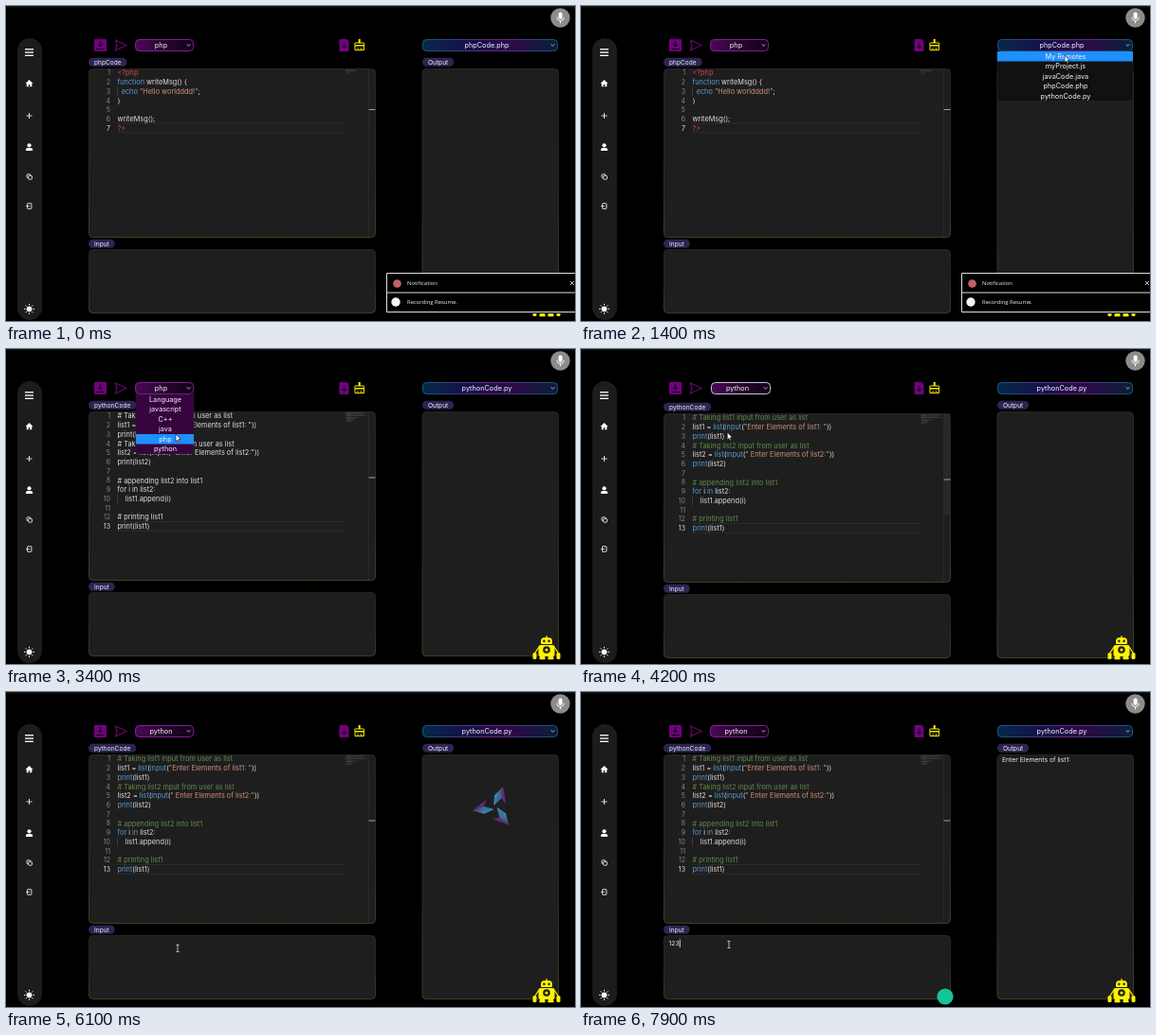
An HTML page with a canvas that plays this animation: 600 by 333 pixels, repeating every 8 s.

```html
<!DOCTYPE html>
<html lang="en">
<head>
<meta charset="utf-8">
<title>Code editor</title>
<style>
html, body { margin: 0; width: 100%; height: 100%; overflow: hidden; background: #000; }
canvas { display: block; width: 600px; height: 333px; }
</style>
</head>
<body>
<canvas id="stage"></canvas>
<script>
const W = 600, H = 333, LOOP = 8000, STEP = 100, TAU = Math.PI * 2;
const canvas = document.getElementById('stage');
const ratio = window.devicePixelRatio || 1;
canvas.width = W * ratio;
canvas.height = H * ratio;
const c = canvas.getContext('2d');
c.scale(ratio, ratio);

const UI = 'Inter, "Open Sans", sans-serif';
const NOTE = '"Open Sans", "Noto Sans", sans-serif';
const PURPLE = '#750080', YELLOW = '#fff200', PANEL = '#1e1e1e', DARK = '#12001a';
const LINE = 9.73, ROW = 10.5;

const PHP = ['<?php', 'function writeMsg() {', '  echo "Hello worldddd!";', '}', '', 'writeMsg();', '?>'];
const PYTHON = [
  '# Taking list1 input from user as list',
  'list1 = list(input("Enter Elements of list1: "))',
  'print(list1)',
  '# Taking list2 input from user as list',
  'list2 = list(input(" Enter Elements of list2:"))',
  'print(list2)', '',
  '# appending list2 into list1',
  'for i in list2:',
  '    list1.append(i)', '',
  '# printing list1',
  'print(list1)'
];
const FILES = ['My Remotes', 'myProject.js', 'javaCode.java', 'phpCode.php', 'pythonCode.py'];
const LANGS = ['Language', 'javascript', 'C++', 'java', 'php', 'python'];
const TOKEN = /(#.*)|("[^"]*")|(<\?php|\?>)|\b(function|echo|print|list|input|for|in)\b/g;
const TOKEN_COLORS = ['#608b4e', '#ce9178', '#d64550', '#569cd6'];

// Pointer stops: time, x, y
const PATH = [
  [0, 470, 244], [1000, 520, 44], [1400, 510, 52], [1700, 510, 94], [2100, 356, 107],
  [2700, 194, 42], [3400, 179, 90], [3700, 168, 105], [5100, 121, 47], [5400, 121, 47],
  [6100, 181, 271], [6800, 156, 267]
];

function pointerAt(t) {
  const i = PATH.findIndex(p => p[0] > t);
  if (i < 0) return PATH[PATH.length - 1].slice(1);
  const [t0, x0, y0] = PATH[i - 1], [t1, x1, y1] = PATH[i];
  let k = (t - t0) / (t1 - t0);
  k = k * k * (3 - 2 * k);
  return [x0 + (x1 - x0) * k, y0 + (y1 - y0) * k];
}

function paint(fill, stroke, lw = 1) {
  if (fill) { c.fillStyle = fill; c.fill(); }
  if (stroke) { c.strokeStyle = stroke; c.lineWidth = lw; c.stroke(); }
}

function box(x, y, w, h, r, fill, stroke, lw) {
  c.beginPath();
  c.roundRect(x, y, w, h, r);
  paint(fill, stroke, lw);
}

function rect(x, y, w, h, fill) {
  c.fillStyle = fill;
  c.fillRect(x, y, w, h);
}

function disc(x, y, r, fill) {
  c.beginPath();
  c.arc(x, y, r, 0, TAU);
  paint(fill);
}

function line(x0, y0, x1, y1, color, lw = 0.8) {
  c.beginPath();
  c.moveTo(x0, y0);
  c.lineTo(x1, y1);
  paint(null, color, lw);
}

function poly(points, fill, stroke, lw) {
  c.beginPath();
  points.forEach(p => c.lineTo(...p));
  c.closePath();
  paint(fill, stroke, lw);
}

function cross(x, y, r, color) {
  line(x - r, y - r, x + r, y + r, color);
  line(x + r, y - r, x - r, y + r, color);
}

function downArrow(x, y) {
  rect(x - 0.8, y - 4, 1.6, 4, DARK);
  poly([[x - 3, y - 0.5], [x + 3, y - 0.5], [x, y + 2.5]], DARK);
}

function setFont(size, family = UI) {
  c.font = size + 'px ' + family;
}

function text(s, x, y, size, color, align = 'left', family = UI) {
  setFont(size, family);
  c.textAlign = align;
  c.fillStyle = color;
  c.fillText(s, x, y + size * 0.36);
}

function gradient(x0, y0, x1, y1, ...colors) {
  const g = c.createLinearGradient(x0, y0, x1, y1);
  colors.forEach((col, i) => g.addColorStop(i / (colors.length - 1), col));
  return g;
}

function sidebar() {
  const x = 24.5;
  box(12, 34, 26, 298, 13, '#1c1c1c');
  for (let i = -1; i <= 1; i++) rect(x - 4.5, 48.4 + i * 3.3, 9, 1.3, '#fff');

  poly([[x - 4, 82], [x, 78], [x + 4, 82]], '#fff');
  rect(x - 2.8, 81.5, 5.6, 3.7, '#fff');
  rect(x - 0.7, 83, 1.4, 2.2, '#1c1c1c');

  line(x - 3, 116, x + 3, 116, '#ddd', 1);
  line(x, 113, x, 119, '#ddd', 1);

  disc(x, 147.3, 2.1, '#fff');
  box(x - 3.6, 149.9, 7.2, 3, [2, 2, 0, 0], '#fff');

  for (const d of [0, 1.6]) box(x - 2.5 + d, 177.8 + d, 3.8, 3.8, 0.7, '#1c1c1c', '#ddd');

  box(x - 2, 208.7, 4.4, 5.6, 0.5, null, '#ddd');
  line(x - 3.6, 211.5, x + 0.6, 211.5, '#ddd');

  disc(x, 320.3, 2.9, '#fff');
  for (let a = 0; a < TAU; a += TAU / 8) {
    const dx = Math.cos(a), dy = Math.sin(a);
    line(x + dx * 4, 320.3 + dy * 4, x + dx * 5.5, 320.3 + dy * 5.5, '#fff', 1);
  }
}

function mic() {
  disc(584.5, 12.5, 10.2, '#8c8c8c');
  box(582.6, 6.5, 4, 7.5, 2, '#fff');
  c.beginPath();
  c.arc(584.6, 11.8, 3.8, 0, Math.PI);
  paint(null, '#fff', 0.9);
  rect(584.1, 15.6, 1, 2.7, '#fff');
}

function select(x, w, label, fill, border, ring) {
  box(x + 0.5, 35.5, w - 1, 12, 4, fill, ring ? '#ded6ea' : border, 0.9);
  text(label, x + w / 2 - 3.5, 41.2, 7.3, '#f4f4f4', 'center');
  const ax = x + w - 5.5;
  line(ax - 1.8, 40.4, ax, 42.2, '#ddd');
  line(ax, 42.2, ax + 1.8, 40.4, '#ddd');
}

function toolbar(s) {
  box(93, 35, 13, 13, 1, PURPLE);
  downArrow(99.5, 41.3);
  rect(95.5, 45, 8, 1.1, DARK);

  poly([[115.5, 36.2], [127, 41.5], [115.5, 46.8], [117, 41.5]], null, s.hover ? '#43084b' : '#5d0867', 1.3);

  const grow = s.langRing ? 1 : 0;
  select(136 + grow, 62 + grow, s.lang,
    gradient(136, 0, 198, 0, '#4b0958', '#28042f', DARK), '#8a259b', s.langRing);

  box(351.5, 35, 10, 13, [1, 4, 1, 1], PURPLE);
  downArrow(356.6, 42.8);

  rect(371.7, 35, 2, 4, YELLOW);
  box(367.8, 39, 9.8, 2.8, 0.5, null, YELLOW);
  box(368, 41.8, 9.4, 4.8, 0, null, YELLOW);
  for (const x of [371, 374.4]) line(x, 44, x, 46.6, YELLOW);

  select(439 - s.fileRing, 143 + 2 * s.fileRing, s.file,
    gradient(439, 0, 582, 0, '#06294a', '#15104a', '#2d0a48', '#08203a'),
    gradient(439, 0, 582, 0, '#176080', '#6f288d', '#176080'), s.fileRing);
}

function pill(label, x, y) {
  setFont(6.6);
  const w = c.measureText(label).width + 12;
  box(x, y, w, 9, 4.5, '#2c2551');
  text(label, x + w / 2, y + 4.6, 6.6, '#ececf6', 'center');
}

function panel(x, y, w, h) {
  box(x + 0.5, y + 0.5, w - 1, h - 1, 4, PANEL, gradient(0, y, 0, y + h, '#2c2a29', '#2e2d25', '#4b4921'), 0.8);
}

function codeLine(s, x, y, colored) {
  const put = (part, color) => {
    text(part, x, y, 7.35, color);
    x += c.measureText(part).width;
  };
  if (!colored) return put(s, '#dedede');
  let last = 0;
  for (const m of s.matchAll(TOKEN)) {
    put(s.slice(last, m.index), '#dedede');
    put(m[0], TOKEN_COLORS[m.slice(1).findIndex(Boolean)]);
    last = m.index + m[0].length;
  }
  put(s.slice(last), '#dedede');
}

function editor(s) {
  const top = 66 + s.shift, last = s.code.length - 1;
  panel(87, top, 303, 179);
  for (const n of [last, last + 1]) {
    const y = top - 0.3 + n * LINE;
    line(117, y, 357, y, '#303030');
  }
  if (s.slider) rect(358, top, 24, 13.5, '#303030');
  s.code.forEach((row, i) => {
    const y = top + 4.8 + i * LINE;
    text(i + 1, 110, y, 7, i === last ? '#dcdcdc' : '#858585', 'right');
    if (row[0] === ' ') rect(117.2, y - 4.8, 0.7, LINE, '#454545');
    codeLine(row, 117.5, y, s.colored);
    rect(358.5, top + 1 + i * 0.75, row.length * 0.46, 0.45, s.colored && row[0] === '#' ? '#38492f' : '#505355');
  });
  rect(382, top + 1, 0.7, 177, '#2d2d2d');
  if (s.slider || s.shift) rect(382.5, top + 0.5, 7, 107, s.slider ? '#484848' : '#292929');
  rect(382.5, top + (s.code === PHP ? 43 : 69.5), 7, 1, '#a0a0a0');
}

function menu(items, x, w, bg, y, chosen) {
  const top = 48;
  const active = y < top ? chosen : Math.min(items.length - 1, Math.floor((y - top) / ROW));
  box(x, top, w, items.length * ROW, 0, bg, '#2a2a2a', 0.5);
  rect(x, top + active * ROW, w, ROW, '#1e90ff');
  items.forEach((item, i) => text(item, x + w / 2 + 0.5, top + ROW * (i + 0.5), 7.3, '#f4f4f4', 'center'));
}

function spinner(t) {
  c.save();
  c.translate(515.5, 122);
  c.rotate((t - 6100) / 1000 * Math.PI - 0.1);
  const tip = [11, -21], fold = [8, -9];
  for (let i = 0; i < 3; i++) {
    poly([tip, [1, -13], [-1, -2], fold], gradient(0, -2, 11, -21, '#2f9fd0', '#4a86b4', '#583a78'));
    poly([tip, fold, [12, -2]], '#672782');
    for (let k = 1; k < 6; k++) line(k * 2, -9 - k * 2, k * 1.5, -3 - k, '#25253c', 0.4);
    c.rotate(TAU / 3);
  }
  c.restore();
}

function robot() {
  const x = 570;
  rect(x - 0.6, 303, 1.2, 3, YELLOW);
  box(x - 6, 305, 12, 7, [4, 4, 1, 1], YELLOW);
  box(x - 8.5, 313, 17, 12, 2, YELLOW);
  disc(x, 318, 3.8, PANEL);
  disc(x, 318, 1.6, YELLOW);
  for (const side of [-1, 1]) {
    disc(x + side * 2.6, 308.8, 1.2, PANEL);
    line(x + side * 8, 315, x + side * 12, 321, YELLOW, 1.3);
    box(x + side * 12.5 - 2, 321, 4, 7, 1.5, YELLOW);
    box(x + side * 4.5 - 3, 324, 6, 4.2, [2.5, 2.5, 0, 0], YELLOW);
  }
}

function notification() {
  rect(401, 282, 199, 43, '#000');
  box(401.5, 282.5, 205, 41, 0, null, '#dedede');
  rect(402, 302.5, 198, 1, '#dedede');
  disc(412.5, 293.5, 4.3, '#c45f70');
  disc(411, 313, 4.7, '#f5f5f5');
  text('Notification', 423, 293.2, 5.9, '#f2f2f2', 'left', NOTE);
  text('Recording Resume.', 423, 313.2, 5.9, '#f2f2f2', 'left', NOTE);
  cross(597, 293, 2, '#eee');
}

function pointer(t) {
  if (t < 100) return;
  c.save();
  c.translate(...pointerAt(t));
  if (t >= 5600) {
    line(0, -3.6, 0, 3.6, '#ddd');
    for (const y of [-3.6, 3.6]) line(-1.6, y, 1.6, y, '#ddd');
  } else if (t >= 4500) {
    box(-2.6, 4, 6.4, 5, 1.5, '#fff', '#111', 0.5);
    box(-1, 0, 2, 6, 1, '#fff');
  } else {
    poly([[0, 0], [0, 7.6], [1.7, 6.1], [2.9, 8.6], [4, 8.1], [2.9, 5.6], [5.2, 5.5]], '#fff', '#111', 0.6);
  }
  c.restore();
}

function stateAt(t) {
  const within = (a, b) => t >= a && t < b;
  const python = t >= 1700, colored = t >= 3700, langRing = within(3700, 5300);
  return {
    code: python ? PYTHON : PHP,
    file: FILES[python ? 4 : 3],
    lang: LANGS[colored ? 5 : 4],
    colored: !python || colored,
    fileRing: within(1700, 2700),
    langRing,
    shift: langRing ? 2 : 0,
    slider: within(2000, 2400),
    hover: within(4800, 5500),
    fileMenu: within(1000, 1700),
    langMenu: within(2800, 3700),
    loading: within(5400, 7300),
    typed: '123'.slice(0, Math.max(0, Math.floor((t - 7200) / 200)))
  };
}

function inputText(s, t) {
  text(s.typed, 92.5, 265.6, 6.8, '#eee');
  const x = 92.7 + c.measureText(s.typed).width;
  if (s.typed || t % 1000 < 500) rect(x, 261.5, 0.8, 8.5, '#fff');
  if (s.typed) disc(384, 322, 8.6, '#15c39a');
}

function draw(t) {
  const s = stateAt(t), y = pointerAt(t)[1];
  rect(0, 0, W, H, '#000');
  rect(0, 0, W, 1.5, '#151515');
  sidebar();
  mic();
  toolbar(s);

  pill(s.code === PYTHON ? 'pythonCode' : 'phpCode', 87, 54.8 + s.shift);
  editor(s);
  pill('Input', 87, 246.8 + s.shift);
  panel(87, 257 + s.shift, 303, 68);
  pill('Output', 439, 54.8);
  panel(438.5, 66, 144.5, 259 + s.shift);

  if (s.loading) spinner(t);
  if (t >= 7300) text('Enter Elements of list1:', 444, 71.5, 6.8, '#eee');
  if (t >= 6300) inputText(s, t);
  robot();
  if (t < 1700) notification();
  if (s.fileMenu) menu(FILES, 439, 143, '#111114', y, 3);
  if (s.langMenu) menu(LANGS, 137, 61, '#380440', y, 4);
  pointer(t);
}

const start = performance.now();
function tick(now) {
  const t = Math.max(0, now - start) % LOOP;
  draw(Math.floor(t / STEP) * STEP);
  requestAnimationFrame(tick);
}
draw(0);
requestAnimationFrame(tick);
</script>
</body>
</html>
```
